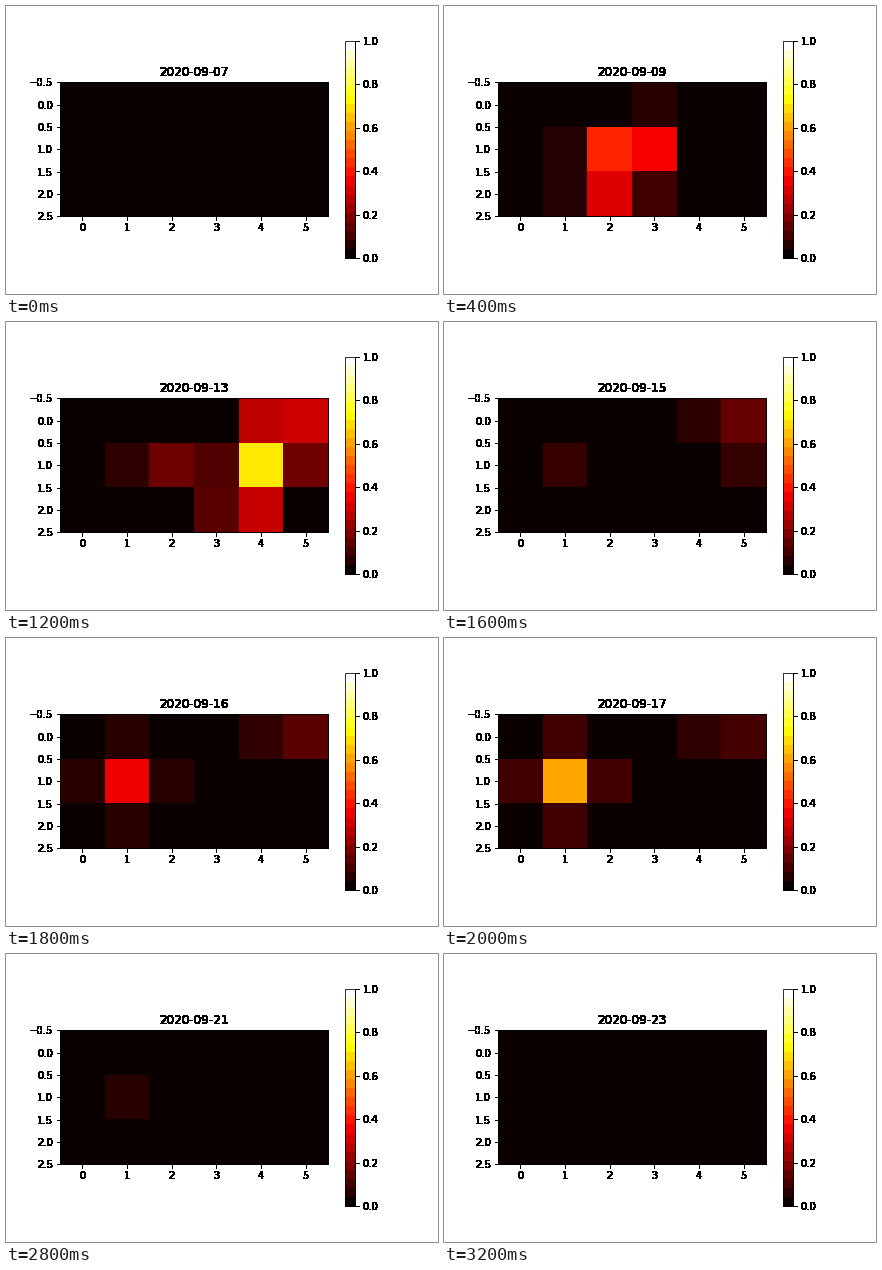
Animation of 432x288 px, one loop 4.2 s. Source, as a matplotlib script:

```python
import matplotlib.pyplot as plt
import numpy as np
from matplotlib.animation import FuncAnimation

STEP = 200
FRAMES = 21
LAST_DAY = 16
ROWS, COLS = 3, 6
BANDS = 24
FLOOR = 0.04  # fainter heat shows as empty

# Each warm spot drifts and fades through (day, x, y, heat) key points.
SPOTS = [
    [(0, 2, 1.5, 0), (4, 2, 1.5, 1), (6, 1.75, 1, 0.17), (8, 1, 1, 0.07),
     (10, 1, 1, 0.61), (12, 1, 1, 0), (13, 1, 1, 0), (15, 1, 1, 0.09),
     (16, 1, 1, 0)],
    [(0, 2, 1, 0), (4, 3.5, 1, 0.72), (6, 4, 1, 0.64), (8, 4, 1, 0)],
    [(4, 4.5, 0, 0), (6, 4.6, 0.15, 0.4), (8, 4.75, 0.3, 0.19),
     (10, 4.6, 0, 0.12), (11, 4.6, 0, 0)],
    [(4, 3, 2, 0), (6, 3.65, 2, 0.25), (8, 4, 2, 0)],
]


def heat_map(day):
    rows, cols = np.mgrid[:ROWS, :COLS]
    heat = np.zeros((ROWS, COLS))
    for spot in SPOTS:
        days, *tracks = zip(*spot)
        x, y, h = (np.interp(day, days, track) for track in tracks)
        heat += h * np.exp(-2 * ((cols - x) ** 2 + (rows - y) ** 2))
    return np.where(heat < FLOOR, 0, heat)


def harden(img, dpi):
    """Make every touched pixel opaque, giving crisp, heavy text."""
    img = np.round(img * 255).astype(np.uint8)
    img[..., 3] = np.where(img[..., 3] > 0, 255, 0)
    return img, 0, 0


plt.rcParams.update({
    "font.family": "DejaVu Sans",
    "font.size": 10,
    "figure.subplot.bottom": 0.125,
})
fig, ax = plt.subplots(figsize=(6, 4), dpi=72)
im = ax.imshow(heat_map(0), cmap="hot", vmin=0, vmax=1)
title = ax.set_title("")

scale = plt.cm.ScalarMappable(plt.Normalize(0, 1), plt.get_cmap("hot", BANDS))
bar = fig.colorbar(scale, ax=ax)
for axes in (ax, bar.ax):
    axes.set_agg_filter(harden)


def update(i):
    day = min(i, LAST_DAY)
    im.set_data(heat_map(day))
    title.set_text(f"2020-09-{7 + day:02d}")
    return im, title


anim = FuncAnimation(fig, update, frames=FRAMES, interval=STEP,
                     init_func=lambda: update(0), repeat=True, repeat_delay=0)
plt.show()
```
